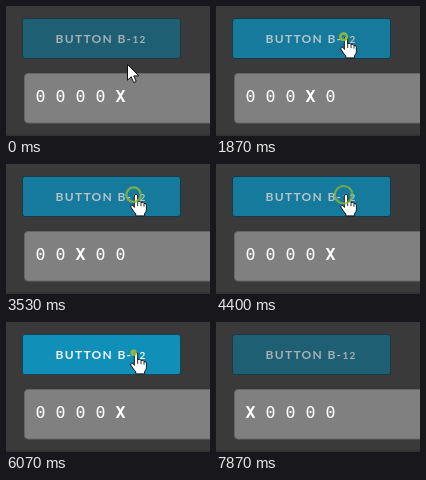
Animation of 204x130 px, one loop 7990 ms. Source, as an HTML page:

```html
<!DOCTYPE html>
<html lang="en">
<head>
<meta charset="utf-8">
<title>Button B-12</title>
<style>
  html, body { margin: 0; width: 100%; height: 100%; overflow: hidden; background: #3a3a3a; }
  svg { display: block; width: 204px; height: 130px; }
  .label { font: 700 12px Lato, sans-serif; letter-spacing: 1.3px; }
  .small { font-size: 10px; }
  .cells { font: 400 16.6px "DejaVu Sans Mono", monospace; fill: #fff; white-space: pre; }
  .mark { font-weight: 700; }
</style>
</head>
<body>
<svg viewBox="0 0 204 130">
  <rect width="204" height="130" fill="#3a3a3a"/>
  <rect y="128" width="204" height="2" fill="#333"/>
  <rect id="button" x="16.5" y="12.5" width="158" height="40" rx="2.5" stroke-width="1"/>
  <text id="label" class="label" x="49.5" y="36.6">BUTTON B-<tspan class="small">12</tspan></text>
  <rect x="18.5" y="67.5" width="200" height="49.5" rx="3.5" fill="#808080" stroke="#666"/>
  <text class="cells" x="29.6" y="96"><tspan id="before"></tspan><tspan class="mark">X</tspan><tspan id="after"></tspan></text>
  <g id="cursor">
    <path id="arrow" d="M.5 .5V16.2L4.2 12.8L6.7 18.6L9.2 17.5L6.8 11.9H11.8Z" fill="#fff" stroke="#111"/>
    <g id="hand" transform="translate(1 -.5)" stroke-linejoin="round" stroke-linecap="round">
      <path d="M-1.7 12.5V1.4Q-1.5 0 0 0T1.7 1.4V7Q4.2 6 5 8Q7.3 7 8 9Q10.4 8.4 10.4 10.8V15Q10.4 17.4 8.6 19V21.4H-.2V19.4Q-2.6 17-5 12.8Q-5.7 11-4.2 10.5Q-2.9 10.3-1.7 12.5Z" fill="#fff" stroke="#111"/>
      <path d="M1.7 7V11M5 8.5V11.3M8 9.5V11.8" fill="none" stroke="#111" stroke-width=".9"/>
    </g>
  </g>
  <circle id="ring" cx="127.6" cy="30.7" fill="none" stroke="#8fb83c"/>
</svg>
<script>
const LOOP = 7990, RING = 345, LEAVE = 6810, GONE = 7130;
const clicks = [670, 1070, 1440, 1800, 2170, 2535, 2870, 3270, 3670, 4070,
  4470, 4870, 5340, 5670, 6070, 6470];
const REST = { fill: [31, 95, 115], edge: [25, 58, 70], text: [164, 177, 182] };
const PRESS = { fill: [21, 122, 156], edge: [22, 58, 72], text: [182, 197, 203] };
const HOVER = { fill: [15, 147, 189], edge: [20, 72, 92], text: [247, 250, 251] };

const $ = id => document.getElementById(id);
const clamp = v => Math.max(0, Math.min(1, v));
const span = (t, a, b) => clamp((t - a) / (b - a));
const ease = v => v * v * (3 - 2 * v);
const mix = (a, b, v) => a + (b - a) * v;
const set = (id, attrs) => {
  for (const k in attrs) $(id).setAttribute(k, attrs[k]);
};
const show = (id, on) => set(id, { visibility: on ? "visible" : "hidden" });
const blend = (a, b, v) => {
  const out = {};
  for (const k in a) out[k] = a[k].map((c, i) => mix(c, b[k][i], v));
  return out;
};
const rgb = c => `rgb(${c.map(Math.round)})`;

function pointer(t) {
  if (t < LEAVE) {
    const v = ease(span(t, 0, 520));
    return [mix(121, 129, v), mix(58, 31, v)];
  }
  const v = ease(span(t, LEAVE, GONE));
  return [mix(129, 3, v), mix(31, 95, v)];
}

function buttonLook(t, age) {
  if (t < clicks[0]) return blend(REST, HOVER, span(t, 170, 400));
  if (t >= LEAVE) {
    const held = blend(HOVER, PRESS, span(t, LEAVE + 60, GONE));
    return blend(held, REST, span(t, 7680, 7860));
  }
  return blend(HOVER, PRESS, span(age, -5, 40) * (1 - span(age, RING - 10, RING + 45)));
}

function draw(t) {
  const count = clicks.filter(c => c <= t).length;
  const age = count ? t - clicks[count - 1] : LOOP;
  const mark = (4 + count) % 5;
  $("before").textContent = "0 ".repeat(mark);
  $("after").textContent = " 0".repeat(4 - mark);

  const look = buttonLook(t, age);
  set("button", { fill: rgb(look.fill), stroke: rgb(look.edge) });
  set("label", { fill: rgb(look.text) });

  const [x, y] = pointer(t);
  const over = x > 16 && y > 12 && y < 52;
  set("cursor", { transform: `translate(${x} ${y})` });
  show("hand", t < GONE && over);
  show("arrow", t < GONE && !over);

  const grow = clamp(age / RING);
  show("ring", age < RING);
  set("ring", { r: mix(1.8, 9, grow), "stroke-width": mix(2.6, 2.2, grow), opacity: mix(1, .75, grow) });
}

const start = performance.now();
function tick() {
  draw((performance.now() - start) % LOOP);
  requestAnimationFrame(tick);
}
tick();
</script>
</body>
</html>
```
